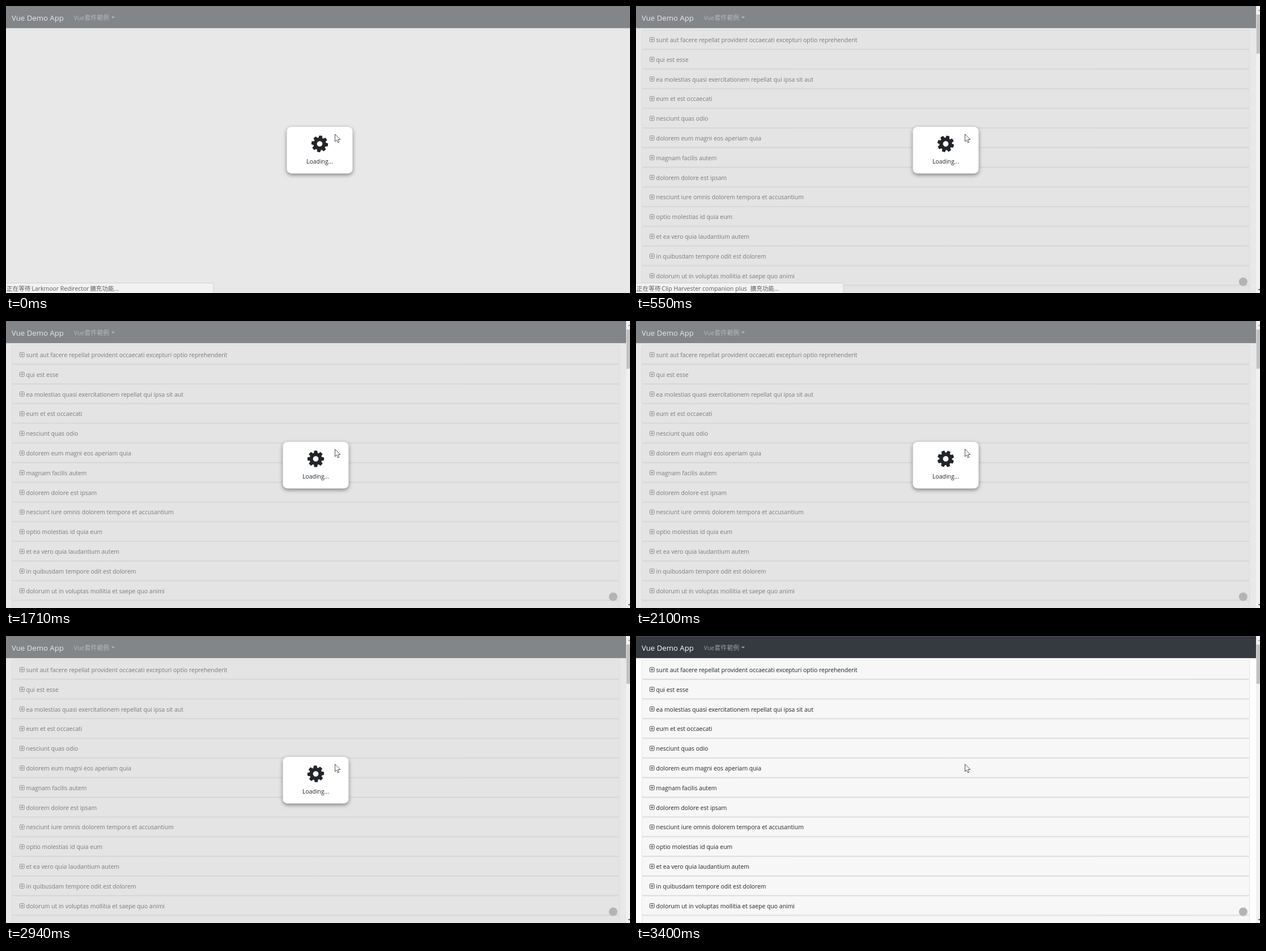
An HTML page with a canvas that plays this animation: 1101 px wide and 508 px high, repeating every 5730 ms.

```html
<!DOCTYPE html>
<html lang="zh-Hant">
<head>
<meta charset="utf-8">
<title>Vue Demo App</title>
<style>
  html, body { margin: 0; width: 100%; height: 100%; overflow: hidden; background: #fff; }
  canvas { display: block; width: 1101px; height: 508px; }
</style>
</head>
<body>
<canvas id="stage" width="1101" height="508"></canvas>
<script>
const W = 1101, H = 508, LOOP = 5730;
const LIST_AT = 314, STATUS_END = 940, LOADED_AT = 3400;
const PAGE_W = 1094;          // page width beside the scrollbar
const PX = 0.683;             // zoom of one CSS pixel
const INK = '#212529';
const FONT = '"Open Sans", "Noto Sans", sans-serif';
const CJK = '"Noto Sans CJK TC", "Noto Sans CJK JP", "Noto Sans CJK", sans-serif';
const ctx = document.getElementById('stage').getContext('2d');

const titles = [
  'sunt aut facere repellat provident occaecati excepturi optio reprehenderit',
  'qui est esse',
  'ea molestias quasi exercitationem repellat qui ipsa sit aut',
  'eum et est occaecati',
  'nesciunt quas odio',
  'dolorem eum magni eos aperiam quia',
  'magnam facilis autem',
  'dolorem dolore est ipsam',
  'nesciunt iure omnis dolorem tempora et accusantium',
  'optio molestias id quia eum',
  'et ea vero quia laudantium autem',
  'in quibusdam tempore odit est dolorem',
  'dolorum ut in voluptas mollitia et saepe quo animi',
  ''
];

// The spinner moves in short holds: [start, number of equal holds until the next start]
const spans = [[0, 1], [80, 6], [550, 1], [620, 1], [700, 6], [1190, 1], [1240, 1],
  [1330, 5], [1710, 1], [1790, 1], [1860, 1], [1940, 7], [2480, 1], [2560, 7],
  [3090, 1], [3170, 2], [3330, 1], [3400, 1]];

function holdTime(t) {
  let i = spans.length - 1;
  while (i > 0 && spans[i][0] > t) i--;
  if (i === spans.length - 1) return spans[i][0];
  const [start, n] = spans[i];
  const hold = (spans[i + 1][0] - start) / n;
  return start + Math.floor((t - start) / hold) * hold;
}

function rect(x, y, w, h, color) {
  ctx.fillStyle = color;
  ctx.fillRect(x, y, w, h);
}

function text(str, x, y, size, color, family = FONT, align = 'left') {
  ctx.font = `${size}px ${family}`;
  ctx.textAlign = align;
  ctx.fillStyle = color;
  ctx.fillText(str, x, y);
}

function roundRect(x, y, w, h, r) {
  ctx.beginPath();
  ctx.roundRect(x, y, w, h, r);
}

function polygon(points, color) {
  ctx.beginPath();
  points.forEach(([x, y]) => ctx.lineTo(x, y));
  ctx.closePath();
  ctx.fillStyle = color;
  ctx.fill();
}

function navbar(width) {
  const link = '#9a9da0';
  rect(0, 0, width, 39.2, '#343a40');
  text('Vue Demo App', 10, 25.8, 13.2, '#fff');
  text('Vue', 119.8, 24.8, 10.42, link);
  text('套件範例', 138.6, 24.8, 10.93, link, CJK);
  polygon([[185.6, 18.8], [192.2, 18.8], [188.9, 22.1]], link);
}

function plusBox(x, y) {
  const side = 8.6, mid = side / 2, arm = 2.5;
  ctx.strokeStyle = INK;
  ctx.lineWidth = 0.8;
  roundRect(x + 0.4, y + 0.4, side - 0.8, side - 0.8, 1.4);
  ctx.moveTo(x + mid - arm, y + mid);
  ctx.lineTo(x + mid + arm, y + mid);
  ctx.moveTo(x + mid, y + mid - arm);
  ctx.lineTo(x + mid, y + mid + arm);
  ctx.stroke();
}

function card(title, i) {
  const x = 9.8, w = 1073.4, h = 34.82, y = 42.2 + i * h;
  const border = 'rgba(0,0,0,0.125)';
  roundRect(x, y, w, h, 2.7);
  ctx.fillStyle = '#f7f7f7';
  ctx.fill();
  roundRect(x + PX / 2, y + PX / 2, w - PX, h - PX, 2.4);
  ctx.strokeStyle = border;
  ctx.lineWidth = PX;
  ctx.stroke();
  rect(x + PX, y + h - 2 * PX, w - 2 * PX, PX, border);
  if (!title) return;
  plusBox(24, y + 13.1);
  text(title, 35.6, y + 21.7, 10.42, INK);
}

function scrollbar() {
  rect(PAGE_W, 0, W - PAGE_W, H, '#f1f1f1');
  rect(PAGE_W + 0.7, 15, W - PAGE_W, 69.5, '#c1c1c1');
  polygon([[1097.3, 9], [1102.1, 9], [1099.7, 6.4]], '#a3a3a3');
  polygon([[1097.3, 501], [1102.1, 501], [1099.7, 503.6]], '#505050');
}

function badge() {
  ctx.beginPath();
  ctx.arc(1071.3, 488, 7.6, 0, 2 * Math.PI);
  ctx.fillStyle = '#b4b4b4';
  ctx.fill();
}

function gear(cx, cy, angle) {
  ctx.save();
  ctx.translate(cx, cy);
  ctx.rotate(angle);
  ctx.scale(14.6 / 768, 14.6 / 768);
  ctx.beginPath();
  for (let i = 0; i < 8; i++) {
    ctx.lineTo(555, -177);
    ctx.lineTo(740, -149);
    ctx.quadraticCurveTo(768, -142, 768, -111);
    ctx.lineTo(768, 111);
    ctx.quadraticCurveTo(768, 142, 740, 149);
    ctx.lineTo(555, 177);
    ctx.rotate(Math.PI / 4);
  }
  ctx.closePath();
  ctx.moveTo(256, 0);
  ctx.arc(0, 0, 256, 0, 2 * Math.PI, true);
  ctx.fillStyle = INK;
  ctx.fill('evenodd');
  ctx.restore();
}

function loader(cx, t) {
  ctx.save();
  ctx.shadowColor = 'rgba(0,0,0,0.45)';
  ctx.shadowBlur = 7;
  ctx.shadowOffsetY = 2.5;
  roundRect(cx - 58, 214, 116, 82.4, 8);
  ctx.fillStyle = '#fff';
  ctx.fill();
  ctx.restore();
  // one turn in two seconds
  gear(cx, 244, (7.2 + holdTime(t) * 0.18) * Math.PI / 180);
  text('Loading...', cx, 279.2, 10.4, INK, FONT, 'center');
}

function statusBar(name, tailX) {
  const color = '#5c5c5c', y = 503.7;
  roundRect(-2, 490.4, 368.2, 22, 3);
  ctx.fillStyle = '#f2f2f2';
  ctx.fill();
  ctx.strokeStyle = '#c8c8c8';
  ctx.lineWidth = 0.8;
  ctx.stroke();
  text('正在等待', 1, y, 10.6, color, CJK);
  text(name, 45.3, y, 10.5, color);
  text('擴充功能', tailX, y, 10.6, color, CJK);
  text('...', tailX + 42.4, y, 10.5, color);
}

function cursor() {
  ctx.save();
  ctx.translate(580.5, 226.8);
  polygon([[0, 0], [0, 13.2], [3, 10.4], [5.1, 15.2], [7.2, 14.3], [5.2, 9.6], [9.4, 9.6]], '#fff');
  ctx.strokeStyle = '#222';
  ctx.lineWidth = 0.8;
  ctx.stroke();
  ctx.restore();
}

function draw(t) {
  const listed = t >= LIST_AT, loading = t < LOADED_AT;
  const width = listed ? PAGE_W : W;
  rect(0, 0, W, H, '#fff');
  navbar(width);
  if (listed) titles.forEach(card);
  if (loading) {
    rect(0, 0, width, H, 'rgba(210,210,210,0.5)');
    loader(listed ? 546.5 : 553.5, t);
  }
  rect(0, 0, width, 0.8, 'rgba(110,110,110,0.5)');
  if (listed) {
    scrollbar();
    badge();
  }
  if (t < LIST_AT) statusBar('Larkmoor Redirector', 148.2);
  else if (t < STATUS_END) statusBar('Clip Harvester companion plus', 201.8);
  cursor();
}

const begin = performance.now();
function tick() {
  draw((performance.now() - begin) % LOOP);
  requestAnimationFrame(tick);
}
tick();
</script>
</body>
</html>
```
